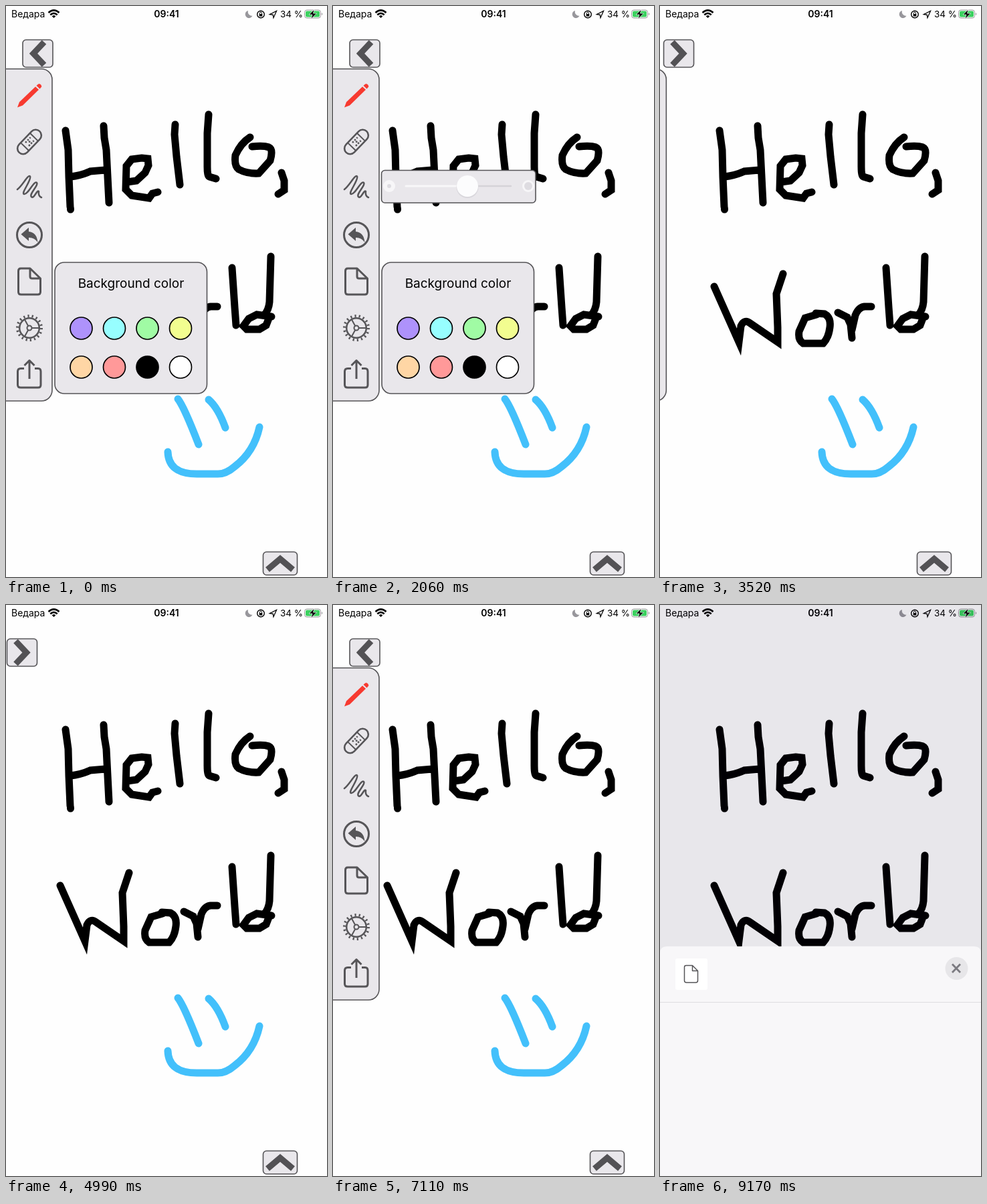
These frames come from a looping animation (480 by 853 pixels, 9230 ms). An HTML page:

```html
<!DOCTYPE html>
<html lang="en">
<head>
<meta charset="utf-8">
<title>Drawing app</title>
<style>
  html, body { margin: 0; width: 100%; height: 100%; overflow: hidden; background: #fefefe; }
  svg { display: block; width: 100vw; height: 100vh; }
  text { font-family: Inter, Roboto, sans-serif; }
  .ink { fill: none; stroke: #000; stroke-width: 11; stroke-linecap: round; }
  .blue { stroke: #43c0fb; stroke-linejoin: round; }
  .box { fill: #e9e7eb; stroke: #555457; stroke-width: 1.6; }
  .chevron { fill: none; stroke: #535255; stroke-width: 9; }
  .icon { fill: none; stroke: #565558; stroke-linejoin: round; }
  .solid { fill: #565558; stroke: none; }
</style>
</head>
<body>
<svg viewBox="0 0 480 853" preserveAspectRatio="none">
  <rect width="480" height="853" fill="#fefefe"/>

  <!-- status bar -->
  <g font-size="13.5">
    <text x="8" y="17" font-size="14">Ведара</text>
    <text x="240" y="17" text-anchor="middle" font-weight="600" font-size="14">09:41</text>
    <text x="410" y="17">34 %</text>
    <g fill="none" stroke="#000" stroke-width="2.6">
      <path d="M63.5 10Q71.500 2.800 79.500 10M66.300 13.200Q71.500 8.600 76.700 13.200"/>
      <path d="M71.500 18L68.700 15.200Q71.500 13 74.300 15.200Z" fill="#000" stroke="none"/>
    </g>
    <path d="M362 7A5.600 5.600 0 1 0 368.500 14.600A6 6 0 0 1 362 7Z" fill="#98979c"/>
    <circle cx="381" cy="12.500" r="5.300" fill="none" stroke="#000" stroke-width="1.400"/>
    <path d="M378.700 12H383.300V15.500H378.700Z"/>
    <path d="M379.500 12V10.500a1.500 1.500 0 0 1 3 0V12" fill="none" stroke="#000"/>
    <path d="M394.500 12.500L404.500 7.500L400 17.500L399.200 13Z" fill="none" stroke="#000" stroke-width="1.300"/>
    <rect x="446.500" y="6" width="24" height="12" rx="3.500" fill="none" stroke="#99999b"/>
    <rect x="448" y="7.500" width="21" height="9" rx="2" fill="#3bd15f"/>
    <path d="M472 10q2.500 2 0 4Z" fill="#99999b"/>
    <path d="M461 5L453 13H458L456 19.500L464.500 11H459.500Z" stroke="#fff" stroke-width=".7"/>
  </g>

  <!-- handwriting -->
  <path class="ink" d="M89 186L93 215L94 255L96 300M146 179L147 197L150 215L152 255L154 294M97 255Q113 253 126 247L149 245"/>
  <path class="ink" stroke-linejoin="round" d="M96.500 303V304"/>
  <path class="ink" d="M181 263L195 261L208 249L213 238L212 228L203 227L188 229L180 239L179 274L188 283L214 287L219 280L227 278"/>
  <path class="ink" d="M253 177L252 192L255 225L260 267M303 162L301 190L301 240Q301 254 304 255L314 258"/>
  <path class="ink" d="M365 196Q351 205 343 223Q341 239 348 244Q361 251 378 250L395 231Q400 214 393 211Q385 208 368 210M412 249L416 261L416 275L407 281"/>
  <path class="ink" d="M81 419L118 502L121 478Q126 467 135 474L176 502L176 480L174 430L184 400"/>
  <path class="ink" d="M234 461L217 466L208 486Q206 499 214 504L244 504Q252 496 254 480Q256 465 246 460L233 459"/>
  <path class="ink" d="M266 458L280 465L285 476L287 496M287 484L292 462Q297 450 306 449L316 449"/>
  <path class="ink" d="M338 391L342 450L344 477M396 374L394 442Q393 454 386 462M397 464L375 461L363 467L355 478L360 483L379 483L389 477L394 464"/>
  <path class="ink blue" d="M257 587Q266 598 288 655M303 588Q317 600 328 630M242 666Q243 699 285 699L315 699Q328 700 342 688Q371 666 379 629"/>

  <g id="tools">
    <rect class="box" x="384.500" y="815.500" width="51" height="34.500" rx="5"/>
    <path class="chevron" d="M391 842L410 826L429 842"/>

    <g id="toggle">
      <rect class="box" x="25" y="50.500" width="45" height="41" rx="5"/>
      <path id="arrow" class="chevron" d="M57 54L41 71L57 88"/>
    </g>

    <g id="panel" stroke-width="3">
      <rect class="box" x="-100" y="94" width="169" height="496" rx="16"/>
      <g fill="#f73a30">
        <path d="M17 151.500L20 143.500L44 120.500L49 125L25 148.500Z"/>
        <path d="M45.500 119L48 116.700Q50 115.500 52 117.500T52.500 121.500L50.500 123.700Z"/>
      </g>
      <g transform="translate(35 203) rotate(-46)">
        <rect class="icon" x="-22" y="-8.500" width="44" height="17" rx="8.500" stroke-width="2.600"/>
        <path class="icon" d="M-10-8V8M10-8V8" stroke-width="2"/>
        <path class="icon" d="M-5-3.500H6M-5 3.500H6M-1 0H2" stroke-dasharray="2.500 2" stroke-width="2.500"/>
      </g>
      <path class="icon" stroke-linecap="round" stroke-width="2.500" d="M17 274C25 268 33 251 36 254.500C39 259 22 280 27 281C33 282 42 260 46 264C49 268 34 281 38 285C42 289 46 274 49 277Q48 284 53 286"/>
      <circle class="icon" cx="35" cy="342" r="18.500"/>
      <path class="solid" d="M22.500 341L34 331V337Q46 338 47.500 353Q42 345.500 34 346V351Z"/>
      <path class="icon" d="M22 392H36L51.500 407V427Q51.500 431 47.500 431H22.500Q18.500 431 18.500 427V396Q18.500 392 22 392ZM36 392V404Q36 407 39 407H51.500"/>
      <g class="icon" transform="translate(35 481)">
        <circle r="14.800" stroke-width="2.500"/>
        <circle r="18" stroke-width="4" stroke-dasharray="2.200 4.083"/>
        <circle r="3.500" stroke-width="2"/>
        <path d="M3.500 0H14M-1.800-3L-7-12.500M-1.800 3L-7 12.500" stroke-width="2"/>
      </g>
      <path class="icon" d="M27 541.500H22Q17.500 541.500 17.500 546V566Q17.500 570 22 570H48Q52 570 52 566V546Q52 541.500 48 541.500H43M35 557V530M27.500 537L35 529.500L42.500 537"/>
    </g>

    <g id="colors">
      <rect class="box" x="73" y="383" width="227.500" height="196" rx="14"/>
      <text x="187" y="421" text-anchor="middle" font-size="19">Background color</text>
    </g>

    <g id="slider">
      <rect class="box" x="72.500" y="245.500" width="230.500" height="48.500" rx="5"/>
      <path d="M109 269H200" stroke="#f8f7f9" stroke-width="3" stroke-linecap="round"/>
      <path d="M200 269H266" stroke="#d5d3d8" stroke-width="2.500" stroke-linecap="round"/>
      <g fill="#f7f6f8">
        <circle cx="84" cy="269" r="9"/>
        <circle cx="292" cy="269" r="9"/>
      </g>
      <g fill="#dedce1">
        <circle cx="84" cy="269" r="3"/>
        <circle cx="292" cy="269" r="6"/>
      </g>
      <circle cx="201" cy="270.500" r="16.500" fill="#d9d7dc"/>
      <circle cx="201" cy="269" r="16" fill="#fcfcfd"/>
    </g>
  </g>

  <rect id="dim" width="480" height="853" fill="#14002b"/>
  <g id="sheet">
    <path d="M0 853V520Q0 510 10 510H470Q480 510 480 520V853Z" fill="#f8f7f9"/>
    <path d="M0 593.500H480" stroke="#dedde0"/>
    <rect x="23" y="528" width="48" height="47" rx="3" fill="#fff"/>
    <path class="icon" stroke-width="1.500" d="M39 538.500H48.500L56.500 546.500V561Q56.500 564 53.500 564H39.500Q36.500 564 36.500 561V541Q36.500 538.500 39 538.500ZM48.500 538.500V546.500H56.500"/>
    <circle cx="443.500" cy="543" r="17" fill="#e7e6e9"/>
    <path d="M437 536.500L449 549M449 536.500L437 549" stroke="#7b7a80" stroke-width="2.800"/>
  </g>
</svg>

<script>
const LOOP = 9230;
const el = id => document.getElementById(id);
const [tools, toggle, arrow, panel, colors, slider, dim, sheet] =
  ['tools', 'toggle', 'arrow', 'panel', 'colors', 'slider', 'dim', 'sheet'].map(el);

const swatches = ['#ae92fb', '#97feff', '#a0fba4', '#f2fd90', '#ffd6a5', '#ff9999', '#000', '#fff'];
colors.insertAdjacentHTML('beforeend', swatches.map((fill, i) =>
  `<circle cx="${112.5 + i % 4 * 49.5}" cy="${i < 4 ? 481.5 : 539.5}" r="16.5" fill="${fill}" stroke="#000" stroke-width="1.7"/>`
).join(''));

const ramp = (t, from, to) => Math.min(1, Math.max(0, (t - from) / (to - from)));

// Slightly underdamped spring from 0 to 1.
function spring(ms) {
  if (ms <= 0) return 0;
  const s = ms / 1000, w = 8.5, decay = 9.6;
  return 1 - Math.exp(-decay * s) * (Math.cos(w * s) + decay / w * Math.sin(w * s));
}

const CLOSE = 3330, OPEN = 5320, SHARE = 8540;

function draw(now) {
  const t = now % LOOP;
  const closed = spring(t - CLOSE) - spring(t - OPEN);
  panel.setAttribute('transform', `translate(${-72 * closed})`);
  toggle.setAttribute('transform', `translate(${-23.5 * closed})`);
  arrow.setAttribute('transform', t >= CLOSE && t < OPEN ? 'translate(95) scale(-1 1)' : '');

  const popups = 1 - ramp(t, 3100, 3300);
  colors.setAttribute('opacity', popups);
  slider.setAttribute('opacity', popups * ramp(t, 1750, 1950));

  tools.setAttribute('visibility', t < SHARE ? 'visible' : 'hidden');
  const rise = 1 - (1 - ramp(t, SHARE, 9080)) ** 3;
  dim.setAttribute('opacity', rise * .09);
  sheet.setAttribute('transform', `translate(0 ${343 * (1 - rise)})`);
}

const start = performance.now();
function tick() {
  draw(performance.now() - start);
  requestAnimationFrame(tick);
}
tick();
</script>
</body>
</html>
```
